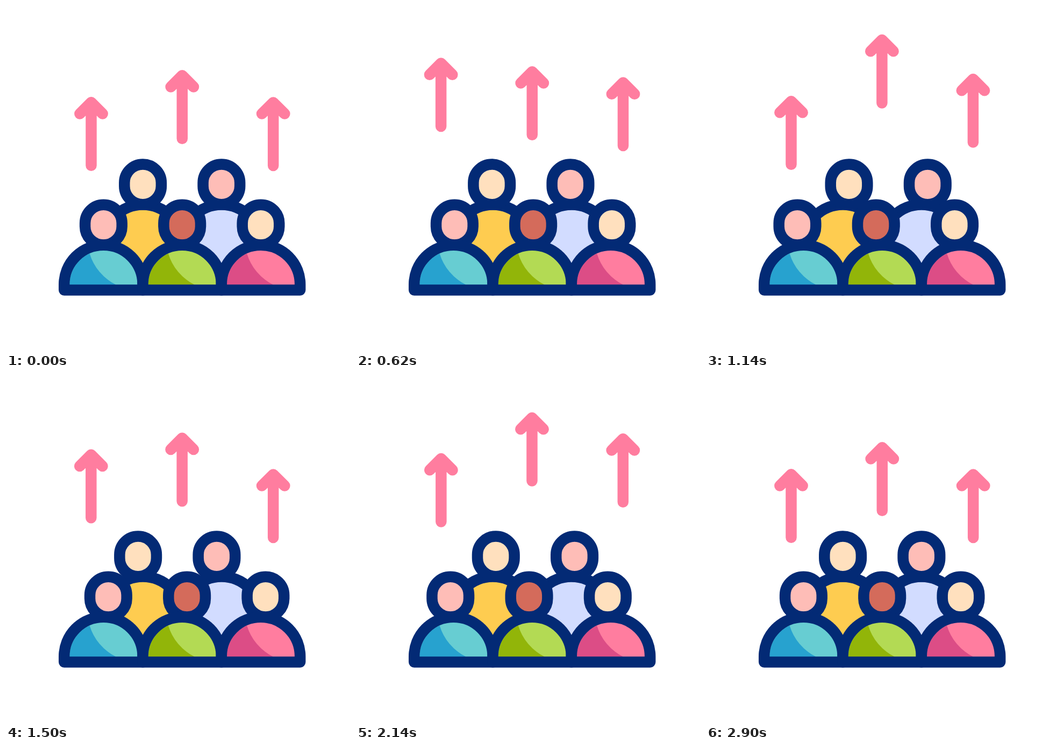
Recreate the animation shown at these times as an HTML page. Size 640 by 640 pixels, loop 3.02 s.

```html
<!DOCTYPE html>
<html lang="en">
<head>
<meta charset="utf-8">
<title>Growing crowd</title>
<style>
  html, body { margin: 0; width: 100%; height: 100%; overflow: hidden; background: #fff; }
  svg { display: block; width: 100%; height: 100%; }
</style>
</head>
<body>
<svg id="stage" viewBox="0 0 640 640" fill="none" stroke-width="20.5" stroke-linecap="round" stroke-linejoin="round"></svg>
<script>
const NAVY = '#032a75', PINK = '#ff7d9f', CREAM = '#ffe0be', ROSE = '#febdb7';
const LOOP = 3020, STEP = 20, SWAY = 13, SWAY_TIME = 400, RISE_TIME = 600;

const back = [
  { x: 254.6, skin: CREAM, shirt: '#fecc50' },
  { x: 400.9, skin: ROSE, shirt: '#d2dcff' },
];
const front = [
  { x: 181.4, skin: ROSE, shirt: '#67cdd2', shade: '#27a2cf' },
  { x: 327.7, skin: '#d46b5b', shirt: '#b3da54', shade: '#92b509' },
  { x: 474, skin: CREAM, shirt: PINK, shade: '#dc4d86' },
];
const arrows = [
  { x: 158.5, y: 179.2, height: 73, delay: 0 },
  { x: 327.8, y: 129.2, height: 67, delay: 500 },
  { x: 497.2, y: 179.4, height: 67, delay: 300 },
];

const head = (p, y) =>
  `<rect x="${p.x - 34.3}" y="${y}" width="68.6" height="74.8" rx="34.3" fill="${p.skin}" stroke="${NAVY}"/>`;

// The path origin is the centre of the shoulder arc.
const body = (p, y, drop) => {
  const outline = `M-73.2 ${drop}V0A73.2 73.2 0 0 1 73.2 0V${drop}Z`;
  const shade = p.shade
    ? `<path d="M-63 0A63 63 0 0 1 -25.8 -57.5A95 95 0 0 0 23 .5V4H-68V0Z" fill="${p.shade}"/>` : '';
  return `<g transform="translate(${p.x} ${y})"><path d="${outline}" fill="${p.shirt}"/>` +
    `${shade}<path d="${outline}" stroke="${NAVY}"/></g>`;
};

const stage = document.getElementById('stage');
stage.innerHTML =
  back.map(p => body(p, 442.6, 60)).join('') +
  `<g id="backHeads">${back.map(p => head(p, 294.4)).join('')}</g>` +
  `<g id="frontHeads">${front.map(p => head(p, 369.8)).join('')}</g>` +
  front.map(p => body(p, 518, 10.5)).join('') +
  arrows.map(() => `<path class="arrow" d="M-21.2 21.2L0 0L21.2 21.2M0 0V117.5" stroke="${PINK}"/>`).join('');

const backHeads = document.getElementById('backHeads');
const frontHeads = document.getElementById('frontHeads');
const arrowPaths = stage.querySelectorAll('.arrow');

const ease = u => u * u * (3 - 2 * u);
const move = (node, x, y) => node.setAttribute('transform', `translate(${x} ${y})`);

// Heads swing left and right six times, then settle in the middle.
function sway(t) {
  const i = Math.floor(t / SWAY_TIME);
  if (i > 6) return 0;
  const stop = k => k === 0 || k === 7 ? 0 : k % 2 ? -SWAY : SWAY;
  return stop(i) + (stop(i + 1) - stop(i)) * ease(t / SWAY_TIME - i);
}

// Each arrow goes up and down twice after its delay; the result is 0 to 1.
function rise(t) {
  const u = t / RISE_TIME;
  if (u <= 0 || u >= 4) return 0;
  return ease(u % 2 < 1 ? u % 2 : 2 - u % 2);
}

function draw(now) {
  const t = Math.min(2900, Math.floor((now % LOOP) / STEP) * STEP);
  const dx = sway(t);
  move(frontHeads, dx, 0);
  move(backHeads, -dx, 0);
  arrows.forEach((a, i) => {
    const r = rise(t - a.delay);
    move(arrowPaths[i], a.x - 0.4 * r, a.y - a.height * r);
  });
}

const start = performance.now();
function tick() {
  draw(performance.now() - start);
  requestAnimationFrame(tick);
}
tick();
</script>
</body>
</html>
```
